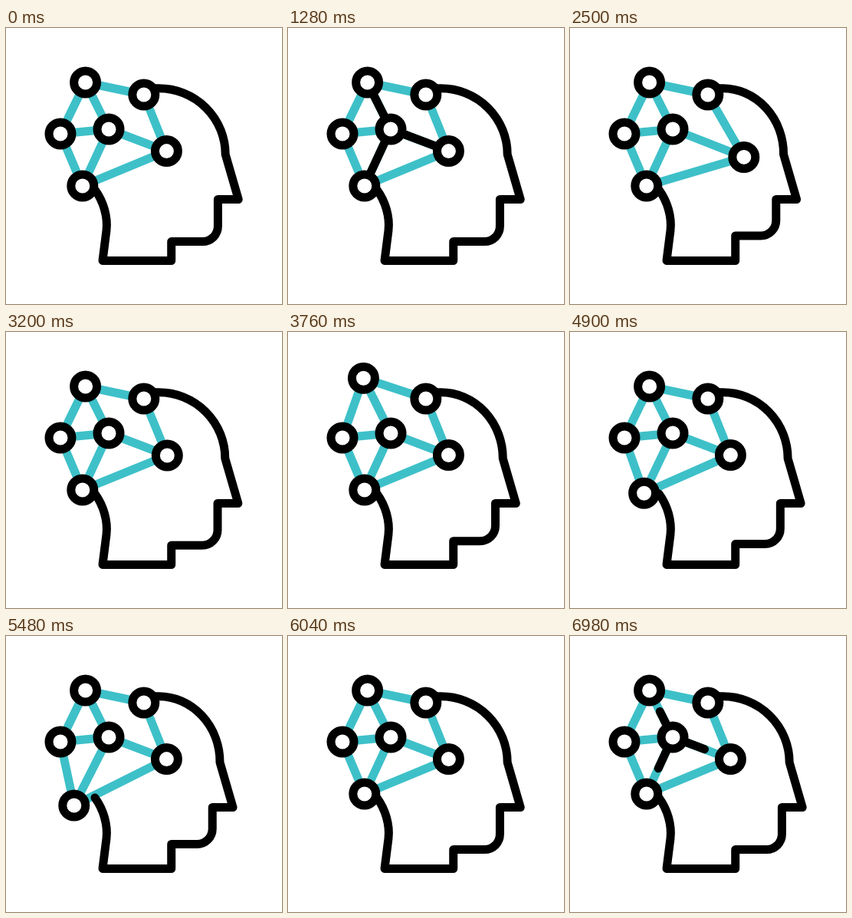
An HTML page for the animation above (7000 ms loop, 360 by 360 pixels).

```html
<!DOCTYPE html>
<html lang="en">
<head>
<meta charset="utf-8">
<title>Thinking head</title>
<style>
  html, body { margin: 0; width: 100%; height: 100%; overflow: hidden; background: #fff; }
  svg { display: block; width: 100vw; height: 100vh; }
  g { fill: none; stroke: #000; stroke-width: 11; stroke-linecap: round; stroke-linejoin: round; }
  #links { stroke: #3ec0c8; }
  #nodes { fill: #fff; }
</style>
</head>
<body>
<svg viewBox="0 0 360 360">
  <g id="links"></g>
  <g id="sparks"></g>
  <g><path id="head"/></g>
  <g id="nodes"></g>
</svg>
<script>
const LOOP = 7000;
const BEAT = 140; // three poses, held 20, 100 and 20 ms

// rest position, then the offset at the height of the pulse and its middle pose
const nodes = {
  a: { x: 103.6, y: 71, dx: -7, dy: -14.5, peak: 85 },
  b: { x: 179.8, y: 87 },
  c: { x: 71, y: 138 },
  d: { x: 134, y: 132 },
  e: { x: 209.4, y: 160.6, dx: 18.3, dy: 8.2, peak: 55 },
  f: { x: 99.8, y: 206, dx: -12.3, dy: 16.7, peak: 115 }
};

const byId = id => document.getElementById(id);

function add(parent, tag) {
  const el = document.createElementNS('http://www.w3.org/2000/svg', tag);
  return byId(parent).appendChild(el);
}

function set(el, attrs) {
  for (const key in attrs) el.setAttribute(key, attrs[key].toFixed(2));
}

const links = ['ac', 'ab', 'be', 'ef', 'cf', 'cd', 'da', 'de', 'df']
  .map(ends => ({ ends, el: add('links', 'line') }));
const sparks = ['da', 'de', 'df'].map(ends => ({ ends, el: add('sparks', 'line') }));
const rings = Object.keys(nodes).map(key => ({ key, el: add('nodes', 'circle') }));
rings.forEach(ring => set(ring.el, { r: 15 }));

// Eased rise and fall, 15 poses each way
function pulse(pose, peak) {
  const u = Math.max(0, 1 - Math.abs(pose - peak) / 15);
  return u * u * (3 - 2 * u);
}

function poseAt(ms) {
  const rest = ms % BEAT;
  return Math.floor(ms / BEAT) * 3 + (rest < 20 ? 0 : rest < 120 ? 1 : 2);
}

function drawLine({ ends, el }, at, part) {
  const [p, q] = [at[ends[0]], at[ends[1]]];
  set(el, {
    x1: p.x, y1: p.y,
    x2: p.x + (q.x - p.x) * part,
    y2: p.y + (q.y - p.y) * part
  });
}

function headPath(s) {
  const jaw = 276.4 - s, chin = 278.6 - s;
  return `M116 211C127 226 133 246 131 264L126 303.5H215.7V${chin}H${jaw - 20}
    A20 20 0 0 0 ${jaw} ${chin - 20}V223.5H${303.2 - s}L${286.2 - s} 165
    A${86.7 - s} 86.2 0 0 0 199.5 78.8H191`;
}

function render(ms) {
  const pose = poseAt(ms);
  const at = {};
  let squeeze = 0;
  for (const key in nodes) {
    const { x, y, dx = 0, dy = 0, peak } = nodes[key];
    const k = peak ? pulse(pose, peak) : 0;
    at[key] = { x: x + dx * k, y: y + dy * k };
    squeeze += 8 * k;
  }
  // the second spark is cut short by the loop
  const reach = pulse(pose, 26) + pulse(pose, 156);
  links.forEach(link => drawLine(link, at, 1));
  sparks.forEach(spark => drawLine(spark, at, reach));
  rings.forEach(({ key, el }) => set(el, { cx: at[key].x, cy: at[key].y }));
  byId('head').setAttribute('d', headPath(squeeze));
}

const start = performance.now();
function tick() {
  render((performance.now() - start) % LOOP);
  requestAnimationFrame(tick);
}
tick();
</script>
</body>
</html>
```
